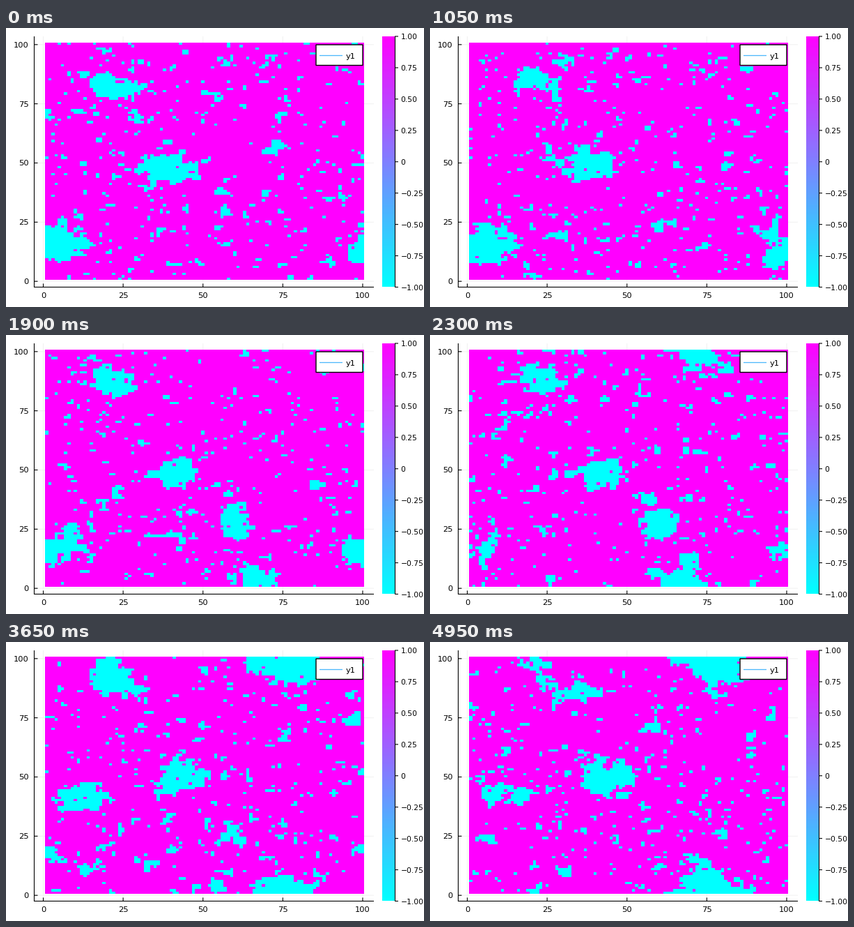
Write a matplotlib script that moves like this. It is 600x400 px and loops after 5000 ms.

```python
import numpy as np
import matplotlib.pyplot as plt
from matplotlib.animation import FuncAnimation
from matplotlib.patches import Rectangle

W, H, DPI = 600, 400, 100
PX = 72 / DPI
N, FRAMES, BURN_IN = 100, 100, 60
TEMP, BIAS, PULL = 2.2, 0.06, 0.7

# Drifting domains of down spins: first step, last step, path start, path end,
# radius.
DOMAINS = [
    (0, 99, (38, 48), (47, 50), 5),
    (0, 20, (4, 15), (4, 14), 6),
    (0, 90, (20, 82), (21, 97), 4),
    (40, 99, (76, 96), (80, 96), 7),
    (28, 99, (66, 4), (76, 4), 4),
    (56, 90, (11, 39), (13, 43), 5),
    (26, 64, (59, 28), (60, 24), 4),
]

rows, cols = np.mgrid[1:N + 1, 1:N + 1]
parity = (rows + cols) % 2
rng = np.random.default_rng(7)


def wrap(d):
    return (d + N / 2) % N - N / 2


def field_at(step):
    """Slight upward bias, with a downward pull inside the live domains."""
    field = np.full((N, N), BIAS)
    for first, last, start, end, radius in DOMAINS:
        if first <= step <= last:
            t = (step - first) / (last - first)
            x, y = np.array(start) * (1 - t) + np.array(end) * t
            r2 = (wrap(cols - x) / 1.3) ** 2 + wrap(rows - y) ** 2
            field[r2 < radius ** 2] = -PULL
    return field


def sweep(spins, field):
    """One Metropolis sweep on a periodic lattice."""
    for half in range(4):
        near = sum(np.roll(spins, shift, axis)
                   for shift in (-1, 1) for axis in (0, 1))
        cost = 2 * spins * (near + field)
        chosen = (parity == half % 2) & (rng.random((N, N)) < 0.5)
        flip = chosen & (rng.random((N, N)) < np.exp(-cost / TEMP))
        spins = np.where(flip, -spins, spins)
    return spins


def simulate():
    spins = np.ones((N, N))
    for _ in range(BURN_IN):
        spins = sweep(spins, field_at(0))
    states = [spins]
    for step in range(1, FRAMES):
        states.append(sweep(states[-1], field_at(step)))
    return states


states = simulate()

plt.rcParams["font.family"] = "DejaVu Sans"
fig = plt.figure(figsize=(W / DPI, H / DPI), dpi=DPI, facecolor="white")
ax = fig.add_axes([0, 0, 1, 1])
ax.axis("off")

LEFT, RIGHT, TOP, BOTTOM = 40.5, 528, 12, 371.5


def px(x):
    return 53.5 + 4.585 * x


def py(y):
    return 363.2 - 3.394 * y


def line(xs, ys, color="black", width=1.1, z=3):
    ax.plot(xs, ys, color=color, lw=width * PX, zorder=z, snap=False,
            solid_capstyle="butt")


def label(x, y, text, ha, size=11.5):
    ax.text(x, y, text, ha=ha, va="center_baseline", fontsize=size * PX,
            zorder=6)


# Grid, ticks and axes
for v in range(0, 101, 25):
    x, y = px(v), py(v)
    line([x, x], [TOP, BOTTOM], "#f2f2f2", z=0)
    line([LEFT, RIGHT], [y, y], "#f2f2f2", z=0)
    line([x, x], [BOTTOM - 5, BOTTOM])
    line([LEFT, LEFT + 5], [y, y])
    label(x, 383, str(v), "center")
    label(33, y, str(v), "right")
line([LEFT, LEFT], [TOP, BOTTOM + 0.5])
line([LEFT - 0.5, RIGHT], [BOTTOM, BOTTOM])

# Colour bar
ramp = np.linspace(-1, 1, 256)[:, None]
ax.imshow(ramp, cmap="cool", extent=(540, 558, 371, 12), origin="lower",
          aspect="auto", zorder=2)
line([558.5, 558.5], [TOP, BOTTOM])
for i in range(9):
    value = 1 - i / 4
    y = TOP + i * (BOTTOM - TOP) / 8
    line([558, 563], [y, y])
    text = f"{value:.2f}".replace("-", "\u2212") if value else "0"
    label(566.5, y, text, "left", 10.7)

# Legend
ax.add_patch(Rectangle((445, 24), 67, 29.5, fc="white", ec="black",
                       lw=1.4 * PX, snap=False, zorder=4))
line([450, 483], [39.5, 39.5], "#4db8fb", 1.3, z=5)
label(487.5, 39.5, "y1", "left")

heat = ax.imshow(states[0], cmap="cool", vmin=-1, vmax=1, origin="lower",
                 extent=(56, 514, 361, 21), aspect="auto",
                 interpolation="nearest", zorder=2)
ax.set_xlim(0, W)
ax.set_ylim(H, 0)


def update(frame):
    heat.set_data(states[frame])
    return [heat]


anim = FuncAnimation(fig, update, frames=FRAMES, interval=50, repeat=True,
                     repeat_delay=0, blit=False)
plt.show()
```
